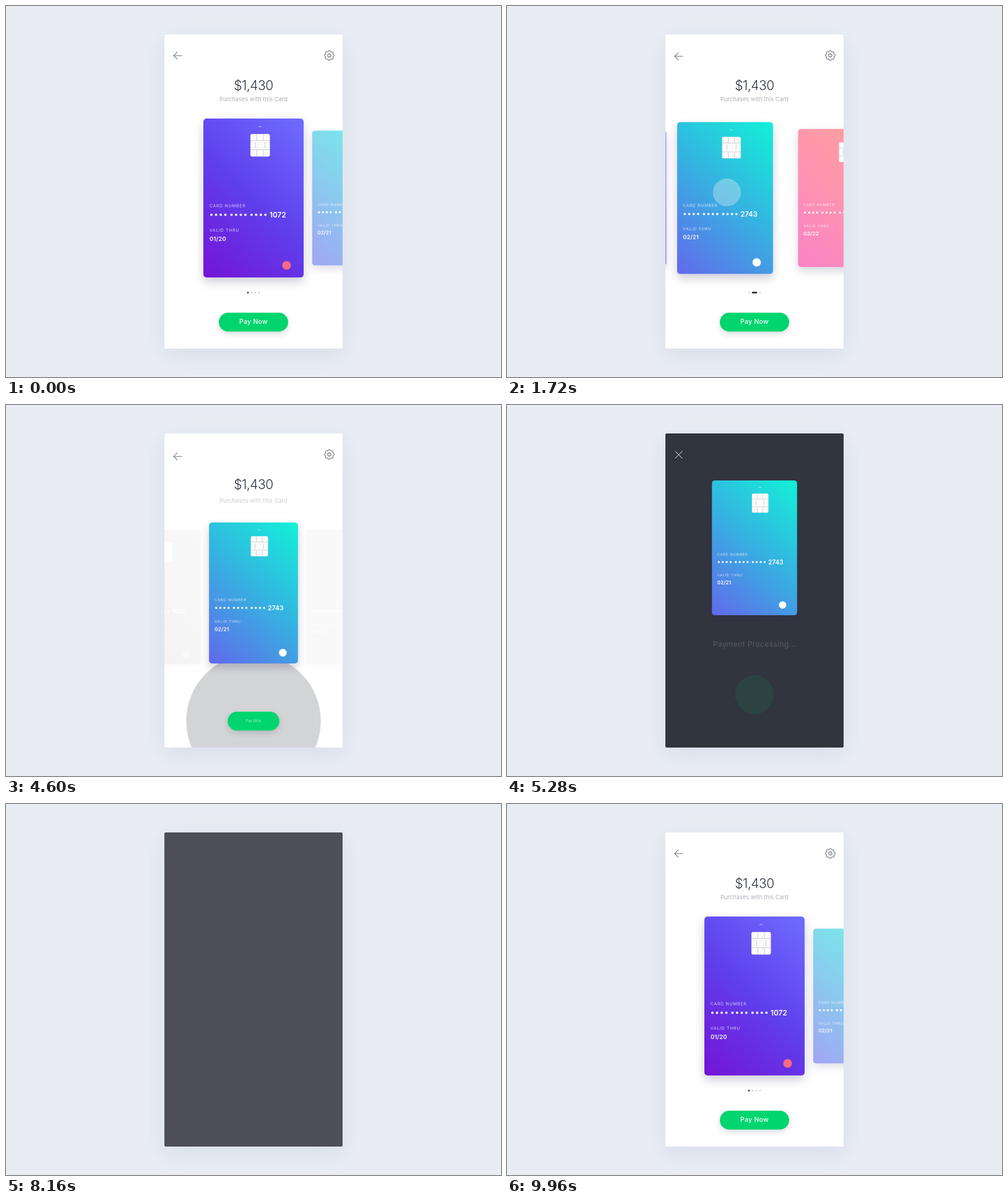
Recreate the animation shown at these times as an HTML page with a canvas. Size 800 by 600 pixels, loop 10000 ms.

```html
<!DOCTYPE html>
<html>
<head>
<meta charset="utf-8">
<style>
html, body { margin: 0; width: 100%; height: 100%; overflow: hidden; background: #e9edf3; }
canvas { display: block; }
</style>
</head>
<body>
<canvas id="stage" width="800" height="600"></canvas>
<script>
const LOOP = 10000, W = 162, H = 257, PAD = 30, STEP = 163.5, MIN = 0.848;
const GREEN = '#00d56f', DARK = '#31353e', INK = '#2f3542';
const ctx = document.getElementById('stage').getContext('2d');
ctx.imageSmoothingQuality = 'high';

const ramp = (t, a, b) => Math.min(1, Math.max(0, (t - a) / (b - a)));
const quad = x => x < 0.5 ? 2 * x * x : 1 - 2 * (1 - x) ** 2;
const cubic = x => x < 0.5 ? 4 * x ** 3 : 1 - 4 * (1 - x) ** 3;
const ease = (t, a, b) => cubic(ramp(t, a, b));
const mix = (a, b, k) => a + (b - a) * k;

function text(c, str, x, y, font, color, spacing = 0, align = 'left') {
  c.font = font + ' Inter, "Open Sans", sans-serif';
  c.letterSpacing = spacing + 'px';
  c.textAlign = align;
  c.fillStyle = color;
  c.fillText(str, x, y);
}

function disc(c, x, y, r, color) {
  c.fillStyle = color;
  c.beginPath();
  c.arc(x, y, Math.max(0, r), 0, 7);
  c.fill();
}

function box(c, x, y, w, h, r, color) {
  c.fillStyle = color;
  c.beginPath();
  c.roundRect(x, y, w, h, r);
  c.fill();
}

function shadow(c, color, blur, dy) {
  c.shadowColor = color;
  c.shadowBlur = blur;
  c.shadowOffsetY = dy;
}

function lines(c, color, width, ...paths) {
  c.strokeStyle = color;
  c.lineWidth = width;
  c.beginPath();
  for (const [x, y, ...rest] of paths) {
    c.moveTo(x, y);
    for (let i = 0; i < rest.length; i += 2) c.lineTo(rest[i], rest[i + 1]);
  }
  c.stroke();
}

function layer(alpha, draw) {
  if (alpha <= 0) return;
  ctx.save();
  ctx.globalAlpha = alpha;
  draw();
  ctx.restore();
}

// Each card is painted once, with its shadow, at double size
const cards = [
  ['#6f6bff', '#5f40ec', '#7416d8', '1072', '01/20', '#f76a86'],
  ['#14efd8', '#37b0e2', '#616ceb', '2743', '02/21', '#fff'],
  ['#ff8b85', '#fd7c9d', '#fa66b8', '6305', '03/22', '#fff'],
  ['#5fe3a8', '#70deba', '#76bbda', '8031', '04/23', '#fff']
].map(paintCard);

function paintCard([top, mid, low, digits, date, mark]) {
  const sprite = document.createElement('canvas');
  sprite.width = (W + 2 * PAD) * 2;
  sprite.height = (H + 2 * PAD) * 2;
  const c = sprite.getContext('2d');
  c.scale(2, 2);
  c.translate(PAD, PAD);
  const g = c.createLinearGradient(178, 22, -16, 235);
  g.addColorStop(0, top);
  g.addColorStop(0.5, mid);
  g.addColorStop(1, low);
  shadow(c, 'rgba(45,40,90,.24)', 32, 14);
  box(c, 0, 0, W, H, 5, g);
  shadow(c, 'transparent', 0, 0);
  lines(c, 'rgba(255,255,255,.6)', 0.8, [89, 14, 91.5, 12.4, 94, 14]);

  box(c, 76, 25, 31.5, 36.5, 2.5, '#fafafa');
  lines(c, '#c4c5cb', 0.8,
    [76, 35.5, 107.5, 35.5], [76, 50.5, 107.5, 50.5],
    [86.5, 25, 86.5, 35.5], [97, 25, 97, 35.5],
    [86.5, 50.5, 86.5, 61.5], [97, 50.5, 97, 61.5],
    [84, 38, 84, 48], [99.5, 38, 99.5, 48]);

  const faint = 'rgba(255,255,255,.78)';
  text(c, 'CARD NUMBER', 10, 143.5, '400 6.6px', faint, 0.9);
  for (let i = 0; i < 12; i++)
    disc(c, 13 + (i >> 2) * 32.4 + (i % 4) * 7.5, 155.6, 1.9, '#fff');
  text(c, digits, 107, 160.2, '600 11.8px', '#fff');
  text(c, 'VALID THRU', 10, 183, '400 6.6px', faint, 0.9);
  text(c, date, 10, 198, '600 9.4px', '#fff', 0.2);
  disc(c, 134.5, 237.5, 7, mark);
  return sprite;
}

function drawCard(i, x, y, k, alpha, filter = 'none') {
  layer(alpha, () => {
    const w = (W + 2 * PAD) * k, h = (H + 2 * PAD) * k;
    ctx.filter = filter;
    ctx.drawImage(cards[i], x - w / 2, y - h / 2, w, h);
  });
}

// Carousel: [start, length, from, to, finger x]
const swipes = [[400, 700, 0, 1, 403], [1508, 650, 1, 2, 403], [2595, 750, 2, 1, 392]];

function scroll(t) {
  if (t > 8600) return 0;
  let s = 0;
  for (const [at, len, from, to] of swipes)
    if (t >= at) s = mix(from, to, quad(ramp(t, at, at + len)));
  return s;
}

const place = u => Math.sign(u) * (STEP * Math.abs(u) + 20 * Math.abs(Math.sin(Math.PI * u)));
const deckX = t => 240 * (1 - ramp(t, 8640, 9227)) ** 3;

function carousel(t) {
  const s = scroll(t), back = t > 8600;
  const fan = back ? ease(t, 9150, 9850) : 1;
  const shrink = back ? 1 : mix(1, MIN, ease(t, 4300, 4800));
  const speed = back
    ? Math.abs(deckX(t) - deckX(t - 40)) / 8
    : Math.abs(s - scroll(t - 40)) * 12;
  const blur = Math.min(0.6, speed);
  const sides = back ? 1 : 1 - ease(t, 4300, 4720);
  const filters = [];
  if (blur > 0.15) filters.push(`blur(${blur}px)`);
  if (sides < 1) filters.push(`saturate(${sides})`);
  for (let i = 0; i < 4; i++) {
    if (i === 1 && !back && t > 4200) continue;
    const u = (i - s) * fan, d = Math.min(1, Math.abs(place(u)) / STEP);
    const x = 400 + place(u) - Math.sign(u) * 81 * (1 - shrink) + (back ? deckX(t) : 0);
    const shown = i === 3 ? 1 : ramp(fan, 0, 0.1);
    drawCard(i, x, 310.5, 1 - (1 - MIN) * d, (1 - 0.4 * d ** 5) * sides * shown,
      filters.join(' ') || 'none');
  }
}

function chosenCard(t) {
  const k = mix(1, MIN, ease(t, 4300, 4800));
  const y = mix(310.5, 231, ease(t, 4410, 5110)) - 330 * ease(t, 7650, 8250);
  drawCard(1, 400, y, k, 1);
}

function pager(t) {
  const back = t > 8600;
  const spread = back ? ease(t, 9100, 9550) : 1;
  const alpha = back ? ramp(t, 8750, 8900) : 1 - ramp(t, 4200, 4450);
  layer(alpha, () => {
    const s = scroll(t), i = Math.floor(s), f = s - i;
    const px = n => 400 + (n * 6 - 9) * spread;
    for (let n = 0; n < 4; n++) disc(ctx, px(n), 463.5, 1.2, '#c6c9d1');
    const a = px(i + ramp(f, 0.72, 1)), b = px(i + ramp(f, 0, 0.2));
    box(ctx, a - 1.3, 462.2, b - a + 2.6, 2.6, 1.3, '#1d2029');
  });
}

function header(t) {
  const back = t > 8400, fresh = ramp(t, 8450, 8800);
  const fade = (a, b) => back ? fresh : 1 - ramp(t, a, b);
  const drift = back ? 0 : 3 * ramp(t, 0, 4600);
  layer(fade(4650, 4950), () => {
    const y = 80.2 + drift;
    lines(ctx, '#70747e', 1.1, [284.5, y, 271, y], [277, y - 6, 271, y, 277, y + 6]);
    ctx.beginPath();
    for (let a = 0; a < 6.3; a += 0.05) {
      const r = 7.2 + 0.75 * Math.cos(8 * a);
      ctx.lineTo(522.5 + r * Math.cos(a), 80 + r * Math.sin(a));
    }
    ctx.closePath();
    ctx.moveTo(525.1, 80);
    ctx.arc(522.5, 80, 2.6, 0, 6.3);
    ctx.stroke();
    text(ctx, '$1,430', 400, 135.6, '300 21px', INK, -0.5, 'center');
  });
  const sink = back ? 0 : 16 * ease(t, 4400, 4900);
  layer(fade(4450, 4850), () =>
    text(ctx, 'Purchases with this Card', 400, 154 + sink, '400 9.2px', '#abaeb6', 0.1, 'center'));
}

function payButton(t) {
  const back = t > 8600;
  const grow = back ? ease(t, 9050, 9500) : 1;
  const e = back ? 0 : ease(t, 4300, 4980);
  const rise = back ? 0 : ease(t, 4900, 5250);
  const alpha = back ? ramp(t, 9050, 9200) : 1 - ramp(t, 5080, 5300);
  layer(alpha, () => {
    const w = mix(mix(112, 30.5, e), 63, rise), h = mix(30.5, 63, rise);
    ctx.translate(400, mix(511.2, 468.5, rise));
    ctx.scale(grow, grow);
    ctx.save();
    shadow(ctx, 'rgba(20,50,60,.16)', 10, 4);
    box(ctx, -w / 2, -h / 2, w, h, h / 2, GREEN);
    ctx.restore();
    const k = 1 - 1.32 * e;
    if (k > 0) layer(alpha * k, () => {
      ctx.scale(k, k);
      text(ctx, 'Pay Now', 0, 3.2, '500 10.4px', '#fff', 0.3, 'center');
    });
  });
}

function fingerprint(t) {
  const sweep = ease(t, 5250, 5950), wipe = ease(t, 5350, 6200);
  ctx.strokeStyle = '#17d384';
  ctx.lineWidth = 1.3;
  ctx.setLineDash([2, 0.8]);
  ctx.beginPath();
  ctx.arc(0, 0, 31.3, -Math.PI / 2, -Math.PI / 2 + sweep * 2 * Math.PI);
  ctx.stroke();
  ctx.beginPath();
  ctx.rect(-20, 20 - 40 * wipe, 40, 40 * wipe);
  ctx.clip();
  ctx.beginPath();
  ctx.ellipse(0, 0, 18, 18.5, 0, 0, 7);
  ctx.clip();
  ctx.rotate(0.35);
  ctx.lineWidth = 1.15;
  for (let n = 0; n < 9; n++) {
    const r = 1.5 + n * 2.15;
    ctx.setLineDash([8 + n * 2.2, 1.4, 5 + n * 1.3, 1.6]);
    ctx.lineDashOffset = n * 5.3;
    ctx.beginPath();
    ctx.moveTo(-r - 2, 20);
    ctx.quadraticCurveTo(-r, 9, -r, 0);
    ctx.ellipse(0, 0, r, r * 1.05, 0, Math.PI, 2 * Math.PI);
    ctx.quadraticCurveTo(r, 9, r - 5, 20);
    ctx.stroke();
  }
}

function processing(t) {
  const out = 1 - ramp(t, 7620, 7950);
  const pulse = 1 + 0.14 * Math.sin(Math.PI * ramp(t, 6900, 7240));
  layer(ramp(t, 4950, 5200) * out, () =>
    lines(ctx, '#e8e9ec', 1, [271.5, 74.5, 283.5, 86.5], [283.5, 74.5, 271.5, 86.5]));
  layer(ramp(t, 5200, 5600) * out, () => {
    ctx.translate(400, 387);
    ctx.scale(pulse, pulse);
    text(ctx, 'Payment Processing...', 0, 4, '400 12px', '#f1f2f4', 0.4, 'center');
  });
  layer(ramp(t, 5200, 5300) * out, () => {
    ctx.translate(400, 468.5);
    ctx.scale(pulse, pulse);
    fingerprint(t);
  });
}

function touches(t) {
  for (const [at, len, from, , x] of swipes) {
    const p = (t - at) / len;
    if (p < -0.3 || p > 0.85) continue;
    const r = 22 * ramp(p, -0.3, -0.05) * (1 - ramp(p, 0.35, 0.8));
    const cx = x + place(from - scroll(t));
    disc(ctx, cx, 301.5, r, 'rgba(238,238,240,.34)');
    ctx.strokeStyle = 'rgba(255,255,255,.3)';
    ctx.lineWidth = 0.8;
    ctx.stroke();
  }
  const tap = ramp(t, 3950, 4130) * (1 - ramp(t, 4200, 4380));
  if (tap) disc(ctx, 400, 511, 17 * tap, 'rgba(235,235,240,.36)');
}

function draw(now) {
  const t = now % LOOP;
  ctx.fillStyle = '#e9edf3';
  ctx.fillRect(0, 0, 800, 600);
  layer(1, () => {
    shadow(ctx, 'rgba(140,160,205,.2)', 36, 10);
    box(ctx, 256, 46, 288, 508, 2, '#fff');
  });
  layer(1, () => {
    ctx.beginPath();
    ctx.roundRect(256, 46, 288, 508, 2);
    ctx.clip();
    const early = t < 5300, late = t > 8600;
    if (early || t > 8400) header(t);
    if (early || late) {
      pager(t);
      carousel(t);
    }
    const flood = ease(t, 4300, 5100);
    if (flood && !late)
      layer(flood * (1 - ease(t, 8000, 8500)), () => disc(ctx, 400, 511, 6 + 482 * flood, DARK));
    if (t > 4200 && t < 8300) chosenCard(t);
    if (early || late) payButton(t);
    if (t > 4900 && t < 8000) processing(t);
    touches(t);
  });
}

const start = performance.now();
function tick() {
  draw(performance.now() - start);
  requestAnimationFrame(tick);
}
tick();
</script>
</body>
</html>
```
